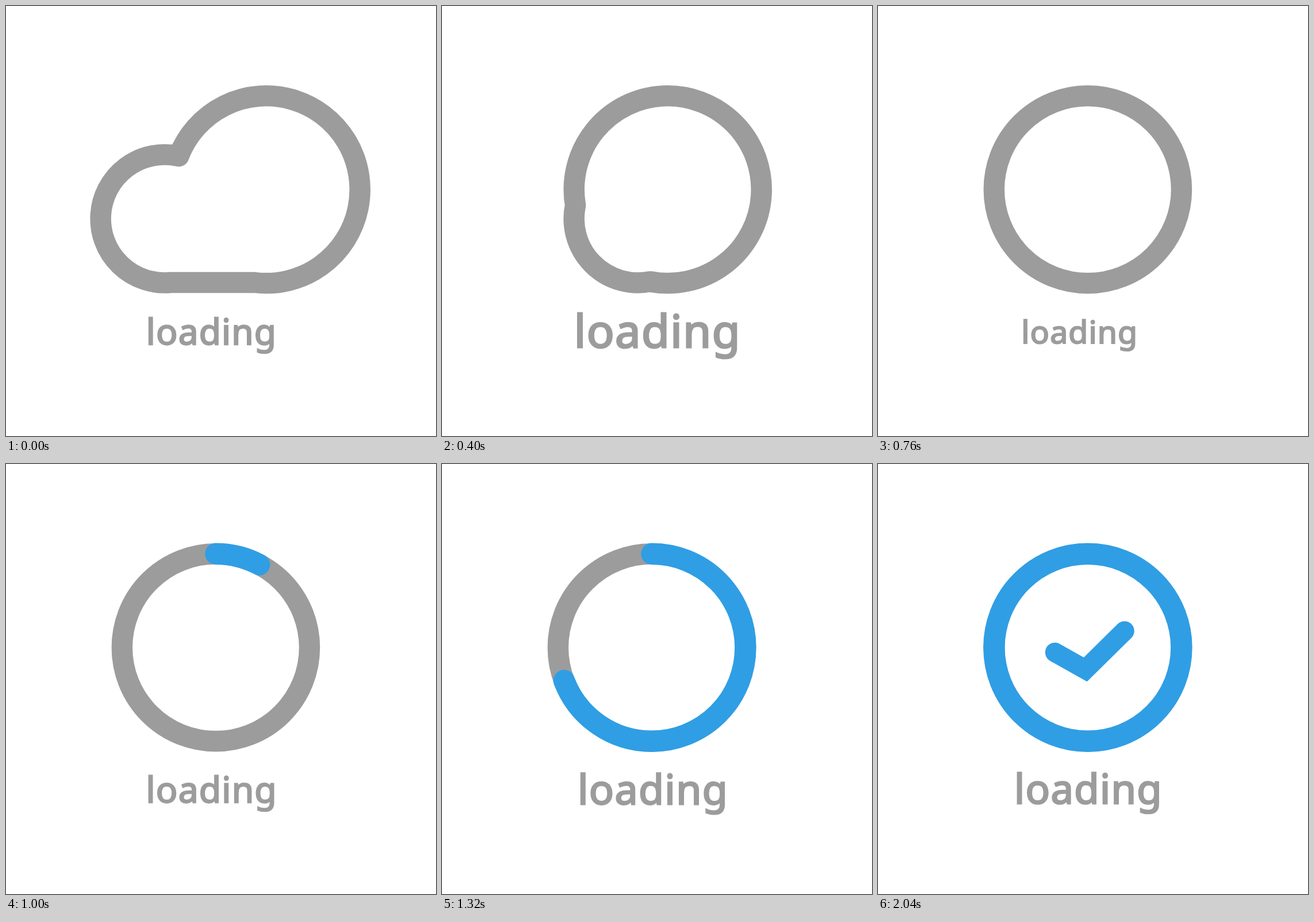
Recreate the animation shown at these times as an HTML page. Size 748 by 748 pixels, loop 2120 ms.

```html
<!DOCTYPE html>
<html lang="en">
<head>
<meta charset="utf-8">
<title>Loading</title>
<style>
  html, body { margin: 0; width: 100%; height: 100%; overflow: hidden; background: #fff; }
  svg { display: block; width: 100%; height: 100%; }
  .line { fill: none; }
  text {
    font: 400 62px "Noto Sans", "Open Sans", sans-serif; letter-spacing: 1.2px;
    fill: #9c9c9c; stroke: #9c9c9c; stroke-width: 2.4px;
  }
</style>
</head>
<body>
<svg viewBox="0 0 748 748">
  <path id="cloud" class="line" stroke="#9c9c9c" stroke-width="36.5" stroke-linejoin="round"/>
  <circle id="ring" class="line" cx="364.9" cy="319.3" r="163" stroke="#309ee4" stroke-width="37.5"
    stroke-linecap="round" transform="rotate(-90 364.9 319.3)"/>
  <path id="tick" class="line" d="M307.8 327.7L360.8 357.5L428.8 290.4" stroke="#309ee4" stroke-width="34"
    stroke-linecap="round" stroke-linejoin="miter"/>
  <g id="label"><text x="-50.9" y="17">loading</text></g>
</svg>
<script>
const LOOP = 2120, STEP = 40, LAST = 2040;
const BIG = 163, SMALL = 111.5, FLOOR = 481;
// [time, label width]
const PULSE = [[0, 219], [360, 301.5], [587, 178], [1373, 258], [1640, 249.2], [1720, 248.8]];
const $ = id => document.getElementById(id);
const cloud = $("cloud"), ring = $("ring"), tick = $("tick"), label = $("label");
const tickLength = tick.getTotalLength();

const progress = (t, from, to) => Math.min(1, Math.max(0, (t - from) / (to - from)));

function keyed(keys, t) {
  let value = keys[0][1];
  for (let i = 1; i < keys.length; i++) {
    value += (keys[i][1] - keys[i - 1][1]) * progress(t, keys[i - 1][0], keys[i][0]);
  }
  return value;
}

function trim(el, length, part) {
  el.style.display = part > 0 ? "" : "none";
  el.setAttribute("stroke-dasharray", part < 1 ? `${length * part} ${length * 2}` : "none");
}

// Outline of two overlapping circles, optionally bridged by a flat bottom.
function cloudPath(t) {
  const bx = Math.max(364.9, 452.7 - 0.15 * t), by = 319.3;
  const sx = 276.1 + 0.1625 * t, sy = 370;
  const dx = bx - sx, dy = by - sy, dist = Math.hypot(dx, dy);
  if (t >= 587 || dist <= BIG - SMALL) {
    return `M${bx} ${by - BIG}a${BIG} ${BIG} 0 1 1 0 ${2 * BIG}a${BIG} ${BIG} 0 1 1 0 ${-2 * BIG}z`;
  }
  const along = (dist * dist + SMALL * SMALL - BIG * BIG) / (2 * dist);
  const half = Math.sqrt(SMALL * SMALL - along * along);
  const ux = dx / dist, uy = dy / dist;
  const mx = sx + ux * along, my = sy + uy * along;
  const top = [mx + uy * half, my - ux * half];
  let right = [mx - uy * half, my + ux * half], left = right;
  if (t < 400) {
    right = [bx - Math.sqrt(BIG ** 2 - (FLOOR - by) ** 2), FLOOR];
    left = [sx + Math.sqrt(SMALL ** 2 - (FLOOR - sy) ** 2), FLOOR];
  }
  const largeArc = (cx, cy, p, q) => {
    const sweep = Math.atan2(q[1] - cy, q[0] - cx) - Math.atan2(p[1] - cy, p[0] - cx);
    return (sweep + 4 * Math.PI) % (2 * Math.PI) > Math.PI ? 1 : 0;
  };
  return `M${top}A${BIG} ${BIG} 0 ${largeArc(bx, by, top, right)} 1 ${right}` +
    (left === right ? "" : `L${left}`) +
    `A${SMALL} ${SMALL} 0 ${largeArc(sx, sy, left, top)} 1 ${top}z`;
}

function draw(time) {
  const t = Math.min(LAST, Math.floor((time % LOOP) / STEP) * STEP);
  cloud.setAttribute("d", cloudPath(t));
  trim(ring, 2 * Math.PI * BIG, progress(t, 960, 1480));
  trim(tick, tickLength, progress(t, 1600, 1800));
  label.setAttribute("transform", `translate(294.7 572) scale(${keyed(PULSE, t) / 219})`);
}

const start = performance.now();
function animate(now) {
  draw(Math.max(0, now - start));
  requestAnimationFrame(animate);
}
draw(0);
requestAnimationFrame(animate);
</script>
</body>
</html>
```
